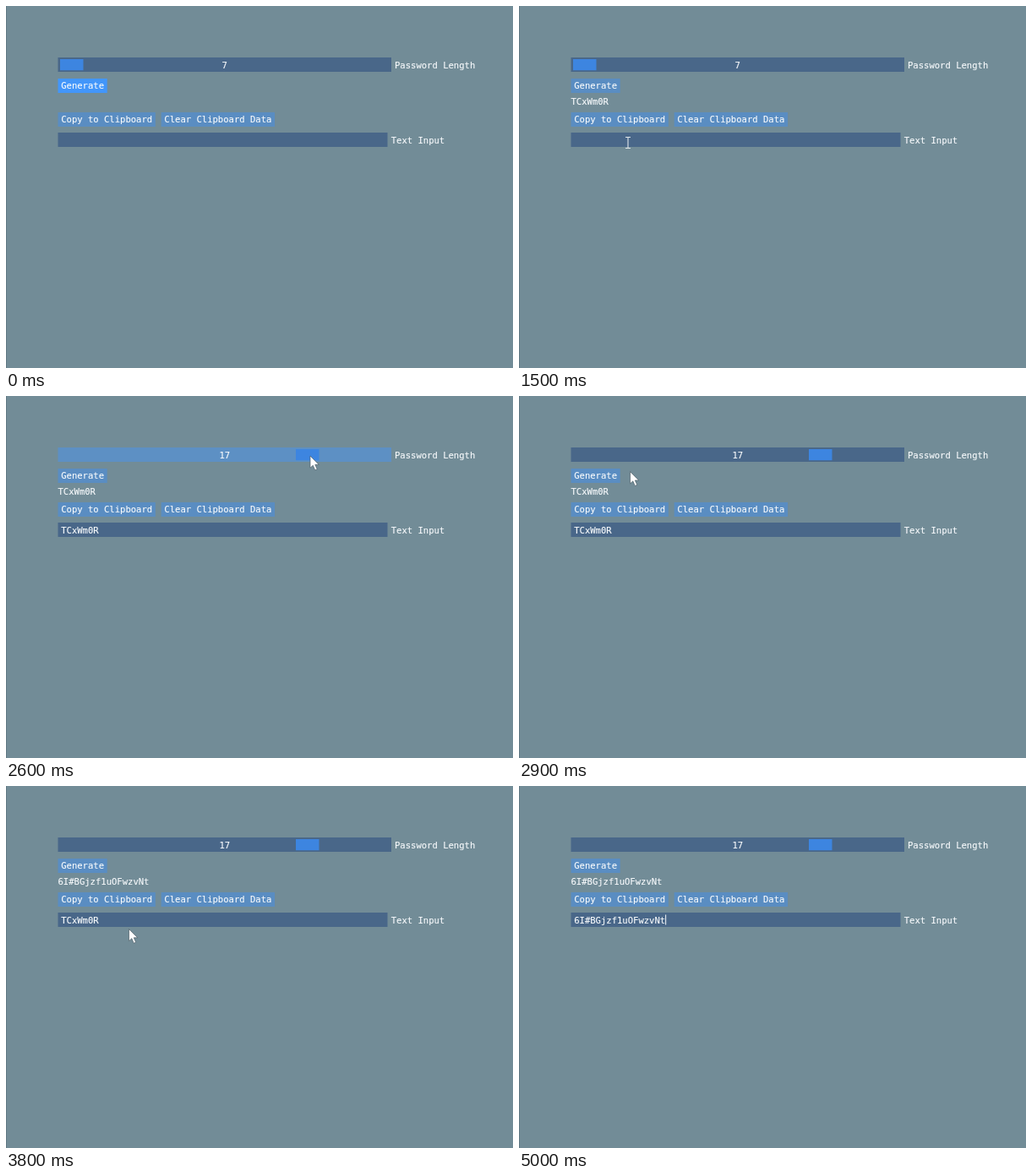
Animation of 600x429 px, one loop 5.3 s. Source, as an HTML page:

```html
<!DOCTYPE html>
<html lang="en">
<head>
<meta charset="utf-8">
<title>Password generator</title>
<style>
html, body { margin: 0; width: 100%; height: 100%; overflow: hidden; background: #728c97; }
svg { display: block; width: 600px; height: 429px; }
text {
  font: 10.55px "DejaVu Sans Mono", "Noto Sans Mono", monospace;
  fill: #f6f9fb; stroke: #f6f9fb; stroke-width: .15px; white-space: pre;
}
</style>
</head>
<body>
<svg viewBox="0 0 600 429"></svg>
<script>
const LOOP = 5300, STEP = 100;
const CHAR = 6.35, PAD = 3.7, HEIGHT = 17, LEFT = 61.5, NOTCH = 27.9;
const SHORT = "TCxWm0R", LONG = "6I#BGjzf1uOFwzvNt";
const FRAME = "#496789", IDLE = "#5a8dc2", HOT = "#4296fa", PRESSED = "#0f87fa";

const svg = document.querySelector("svg");
const clamp = (v, lo, hi) => Math.max(lo, Math.min(hi, v));
const within = (v, a, b) => v >= a && v < b;
const set = (el, attrs) => { for (const k in attrs) el.setAttribute(k, attrs[k]); };
const show = (el, on) => set(el, { visibility: on ? "visible" : "hidden" });

function add(tag, attrs) {
  const el = document.createElementNS("http://www.w3.org/2000/svg", tag);
  set(el, attrs);
  return svg.appendChild(el);
}

function label(x, y, str = "") {
  const el = add("text", { x, y });
  el.textContent = str;
  return el;
}

function box(x, y, width, fill) {
  const el = add("rect", { x, y, width, height: HEIGHT, fill });
  const hit = p => within(p.x, x, x + width) && within(p.y, y, y + HEIGHT);
  return { el, x, y, width, hit };
}

function button(x, y, str) {
  const b = box(x, y, str.length * CHAR + 2 * PAD, IDLE);
  label(x + PAD, y + 12.3, str);
  b.paint = (p, pressed) => set(b.el, { fill: pressed ? PRESSED : b.hit(p) ? HOT : IDLE });
  return b;
}

add("rect", { width: 1, height: 429, fill: "#627984" });

const slider = box(LEFT, 61, 394.5, FRAME);
const grab = add("rect", { y: 63, width: 27.5, height: 13.2 });
const value = label(slider.x + slider.width / 2, 73.8);
set(value, { "text-anchor": "middle" });
label(460, 73.8, "Password Length");

const generate = button(LEFT, 86, "Generate");
const password = label(LEFT, 116.8);
const copy = button(LEFT, 126, "Copy to Clipboard");
const clear = button(copy.x + copy.width + 6.8, 126, "Clear Clipboard Data");

const input = box(LEFT, 150, 390, FRAME);
const textX = LEFT + PAD;
const selection = add("rect", { y: 152, height: 13, fill: "#4884c0" });
const field = label(textX, 162.7);
const caret = add("rect", { y: 152.5, width: 1, height: 12, fill: "#f6f9fb" });
label(455.7, 162.7, "Text Input");

const arrow = add("path", {
  d: "M0 0V14.2L3.3 11.2L5.7 16.8L8.2 15.7L5.8 10.3H10.2Z",
  fill: "#fff", stroke: "#4c5d68", "stroke-width": .7
});
const beam = add("path", {
  d: "M-3 -6.5H3M0 -6.5V6.5M-3 6.5H3",
  fill: "none", stroke: "#dfe6ea", "stroke-width": 1.1
});

const at = (x, y) => ({ x, y });
const onGenerate = at(103, 92), onCopy = at(122, 131);
const moves = [
  { from: 300, to: 600, end: onCopy },
  { from: 1000, to: 1500, end: at(129, 162) },
  { from: 1800, to: 2100, end: at(78, 70) },
  { from: 2100, to: 2500, end: at(360, 71) },
  { from: 2700, to: 3000, end: onGenerate },
  { from: 3000, to: 3300, end: onCopy },
  { from: 3300, to: 3800, end: at(145.5, 169.5) },
  { from: 3800, to: 4200, end: at(292, 159) },
  { from: 4200, to: 4500, end: at(textX, 159) },
  { from: 4700, to: 5000, end: at(390, 128) }
];

function pointer(t) {
  return moves.reduce((p, { from, to, end }) => {
    const rest = 1 - clamp((t - from) / (to - from), 0, 1);
    const k = 1 - rest * rest;
    return at(p.x + (end.x - p.x) * k, p.y + (end.y - p.y) * k);
  }, onGenerate);
}

function draw(time) {
  const t = Math.floor(time % LOOP / STEP) * STEP;
  const seen = within(t, 100, 5000);
  const p = t < 5000 ? pointer(t) : at(-50, -50);

  const drag = within(t, 2100, 2600);
  const notch = t < 2100 ? 0 : drag ? clamp(Math.round((p.x - 77.5) / NOTCH), 0, 10) : 10;
  set(slider.el, { fill: drag ? "#5293da" : slider.hit(p) ? "#5d90c4" : FRAME });
  set(grab, { x: 64 + notch * NOTCH, fill: drag ? HOT : "#3d85e0" });
  value.textContent = SHORT.length + notch;

  generate.paint(p, t === 200 || t === 3000);
  copy.paint(p, t === 800 || t === 3300);
  clear.paint(p, false);
  password.textContent = t < 300 ? "" : t < 3100 ? SHORT : LONG;

  const typed = t < 1800 ? "" : t < 4700 ? SHORT : LONG;
  const count = typed.length;
  const selecting = within(t, 4200, 4700);
  const from = selecting ? clamp(Math.round((p.x - textX) / CHAR), 0, count) : count;
  field.textContent = typed;
  set(selection, { x: textX + from * CHAR, width: (count - from) * CHAR });
  set(caret, { x: textX + from * CHAR });
  show(caret, within(t, 1600, 2100) || t >= 4200);

  const overText = input.hit(p);
  show(arrow, seen && !overText);
  show(beam, seen && overText);
  for (const el of [arrow, beam]) set(el, { transform: `translate(${p.x} ${p.y})` });
}

const start = performance.now();
function tick() {
  draw(performance.now() - start);
  requestAnimationFrame(tick);
}
tick();
</script>
</body>
</html>
```
